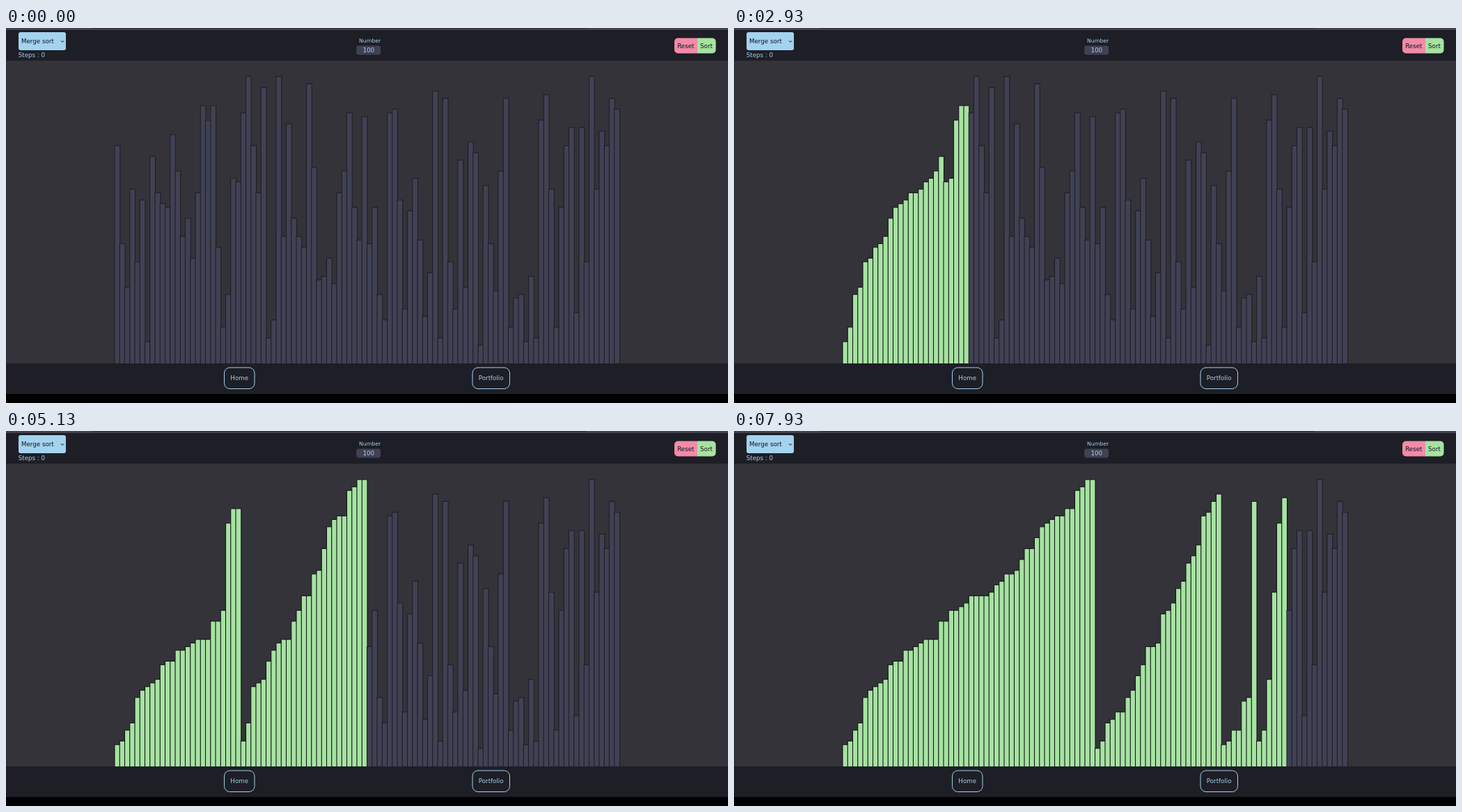
An HTML page with a canvas that plays this animation: 1037 by 540 pixels, repeating every 8 s.

```html
<!DOCTYPE html>
<html lang="en">
<head>
<meta charset="utf-8">
<title>Merge sort</title>
<style>
  html, body { margin: 0; width: 100%; height: 100%; overflow: hidden; background: #000; }
  canvas, svg { position: absolute; left: 0; top: 0; width: 1037px; height: 540px; }
  text { font: 8.7px "DejaVu Sans", Verdana, sans-serif; fill: #a3d3ef; }
  .mid { text-anchor: middle; }
  .dark { fill: #11111b; }
  .link { fill: none; stroke: #a3d3ef; stroke-width: 1; }
</style>
</head>
<body>
<canvas id="stage" width="1037" height="540"></canvas>
<svg viewBox="0 0 1037 540">
  <rect x="18" y="6" width="68" height="26" rx="3" fill="#a3d3ef"/>
  <text class="dark" x="22" y="22.2">Merge sort</text>
  <path d="M78.8 18.2l2.2 2.2 2.2-2.2" fill="none" stroke="#11111b"/>
  <text x="17.8" y="41.7">Steps : 0</text>
  <text class="mid" x="522.6" y="20.7" style="font-size:7.75px">Number</text>
  <rect x="503.3" y="25.5" width="34.7" height="13" rx="3" fill="#414154"/>
  <text class="mid" x="520.8" y="35.2">100</text>
  <path d="M993 14.5h-28a5 5 0 0 0-5 5v12a5 5 0 0 0 5 5h28z" fill="#f38ba8"/>
  <path d="M993 14.5h21.5a5 5 0 0 1 5 5v12a5 5 0 0 1-5 5H993z" fill="#a6e3a1"/>
  <text class="mid dark" x="976.3" y="29">Reset</text>
  <text class="mid dark" x="1006" y="29">Sort</text>
  <rect class="link" x="313.5" y="489" width="43.5" height="30.5" rx="8"/>
  <text class="mid" x="335.2" y="507.3">Home</text>
  <rect class="link" x="670" y="489" width="53.5" height="30.5" rx="8"/>
  <text class="mid" x="696.7" y="507.3">Portfolio</text>
</svg>
<script>
const ctx = document.getElementById("stage").getContext("2d");
const LOOP = 8000, FPS = 15;
const LEFT = 156, PITCH = 7.25, WIDTH = 7.75, FLOOR = 483, UNIT = 5.23;

const values = [
  60, 33, 21, 48, 28, 45, 6, 57, 47, 44, 43, 63, 53, 35, 40, 29, 47, 71, 67, 71,
  32, 10, 19, 51, 50, 69, 79, 60, 47, 76, 7, 12, 79, 35, 66, 40, 35, 32, 77, 54,
  23, 24, 29, 22, 47, 53, 69, 43, 34, 68, 33, 43, 19, 12, 69, 70, 45, 15, 42, 51,
  34, 13, 25, 75, 7, 73, 28, 15, 56, 21, 61, 58, 5, 49, 33, 20, 53, 73, 10, 18,
  19, 6, 24, 7, 67, 74, 48, 10, 43, 60, 65, 14, 65, 28, 79, 48, 64, 60, 73, 70
];

// Time in ms against the number of writes done
const pace = [[1245, 0], [2333, 72.5], [3400, 145.5], [4333, 206.5],
              [5555, 286], [6000, 319.5], [7067, 388.5], [7933, 446.5]];

const writes = [];   // [index, value] in order
const reached = [];  // writes done -> bars visited by then

function mergeSort(a, lo, hi) {
  if (lo >= hi) return;
  const mid = (lo + hi) >> 1;
  mergeSort(a, lo, mid);
  mergeSort(a, mid + 1, hi);
  reached[writes.length] = hi + 1;
  const l = a.slice(lo, mid + 1), r = a.slice(mid + 1, hi + 1);
  for (let k = lo; k <= hi; k++) {
    a[k] = !r.length || l[0] <= r[0] ? l.shift() : r.shift();
    writes.push([k, a[k]]);
  }
}
mergeSort(values.slice(), 0, values.length - 1);

function writesAt(t) {
  if (t < pace[0][0]) return -1;
  let i = 1;
  while (i < pace.length - 1 && t >= pace[i][0]) i++;
  const [t0, w0] = pace[i - 1], [t1, w1] = pace[i];
  return Math.floor(w0 + (w1 - w0) * (t - t0) / (t1 - t0));
}

function box(color, x, y, w, h) {
  ctx.fillStyle = color;
  ctx.fillRect(x, y, w, h);
}

function drawPage() {
  box("#000", 0, 0, 1037, 540);
  box("#41424d", 0, 0, 1037, 3);
  box("#292a33", 125, 0, 708, 1);
  box("#1e1e26", 0, 3, 1037, 524);
  box("#343339", 0, 47, 1037, 436);
  box("#28282e", 0, 47, 1, 436);
}

function draw(t) {
  const done = writesAt(t), bars = values.slice();
  let green = 0;
  for (let i = 0; i <= done; i++) {
    if (reached[i]) green = Math.max(green, reached[i]);
    if (i < done) bars[writes[i][0]] = writes[i][1];
  }
  drawPage();
  ctx.save();
  ctx.beginPath();
  ctx.rect(0, 47, 1037, FLOOR - 47);
  ctx.clip();
  ctx.lineWidth = 1.1;
  bars.forEach((v, i) => {
    const x = LEFT + i * PITCH, y = FLOOR + 0.1 - v * UNIT;
    box(i < green ? "#a6e3a1" : "#414154", x, y, WIDTH, v * UNIT + 2);
    ctx.strokeStyle = i < green ? "#15151c" : "#1e1e27";
    ctx.strokeRect(x, y, WIDTH, v * UNIT + 2);
  });
  ctx.restore();
}

const start = performance.now();
function tick() {
  const t = (performance.now() - start) % LOOP;
  draw(Math.floor((t + 3.5) * FPS / 1000) * 1000 / FPS);
  requestAnimationFrame(tick);
}
tick();
</script>
</body>
</html>
```
